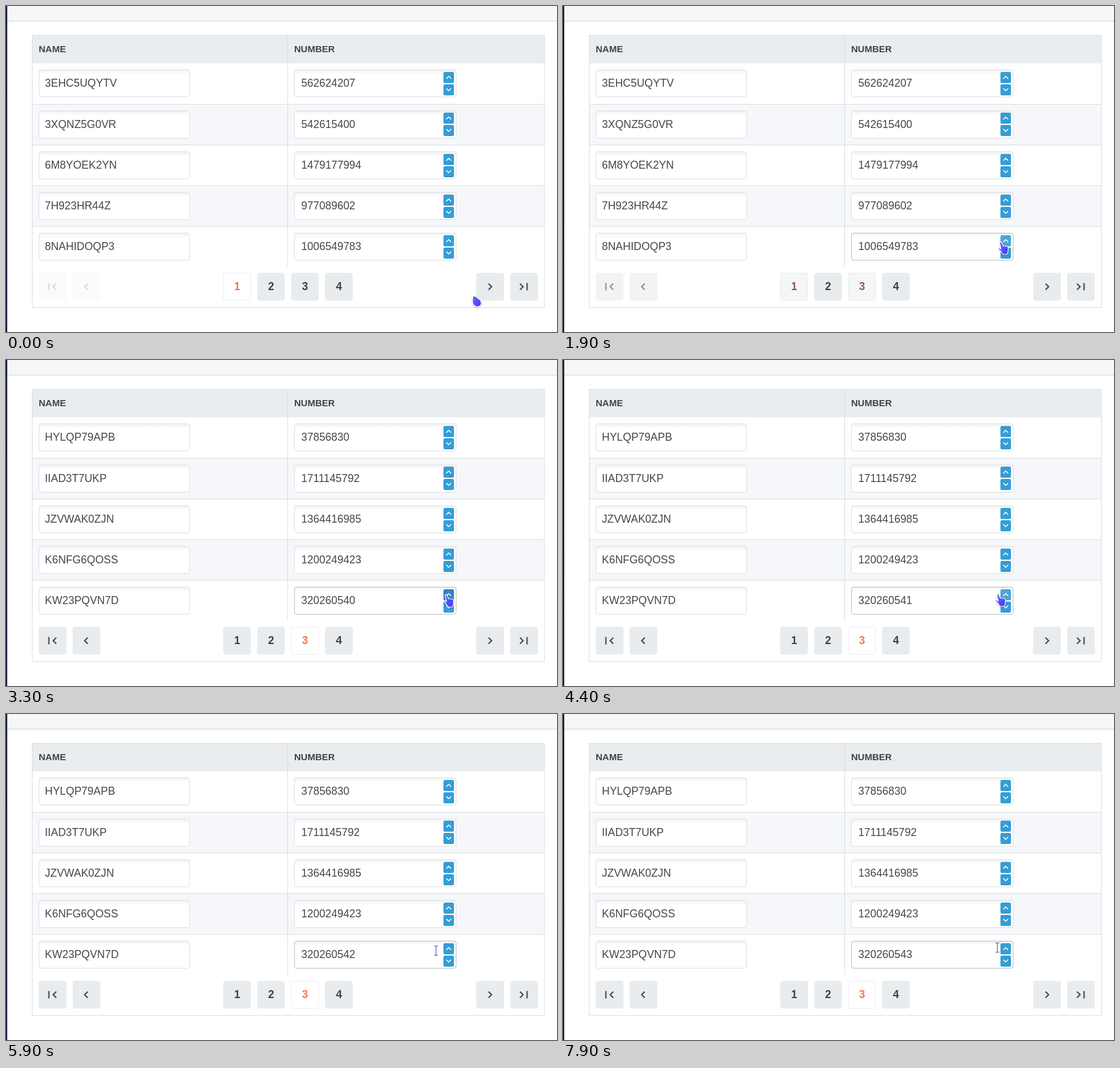
An HTML page for the animation above (8 s loop, 893 px wide and 529 px high).

```html
<!DOCTYPE html>
<html lang="en">
<head>
<meta charset="utf-8">
<title>Editable table</title>
<style>
html, body { margin: 0; width: 100%; height: 100%; overflow: hidden; background: #fff; }
svg { display: block; }
text { font: 17.5px "Liberation Sans", Arial, sans-serif; fill: #40484e; }
.head { font-size: 15px; font-weight: bold; fill: #3d464d; }
.page { font-weight: bold; text-anchor: middle; }
.icon { fill: none; stroke: #43484c; stroke-width: 2.1; }
.spin { fill: none; stroke: #fff; stroke-width: 1.5; stroke-linecap: round; stroke-linejoin: round; }
.cursor { stroke: #fff; stroke-width: 1.2; stroke-linejoin: round; filter: drop-shadow(0 1px 1px rgba(0,0,0,.25)); }
</style>
</head>
<body>
<svg id="stage" width="893" height="529" viewBox="0 0 893 529">
  <defs>
    <linearGradient id="edge" x2="0" y2="1">
      <stop stop-color="#0b1a3c"/><stop offset="1" stop-color="#2a0d52"/>
    </linearGradient>
    <linearGradient id="inset" x2="0" y2="1">
      <stop stop-color="#f2f2f2"/><stop offset=".17" stop-color="#fff"/>
    </linearGradient>
    <linearGradient id="ink" x2="1" y2="1">
      <stop stop-color="#7a62f6"/><stop offset="1" stop-color="#3d3dff"/>
    </linearGradient>
  </defs>
</svg>
<script>
const LOOP = 8000, STEP = 100, FADE = 200;
const BASE = 320260538;
const GREY = '#e9ecef', INK = '#394147', ACCENT = { 1: '#fa6b53', 3: '#f2784b' };

const PAGES = {
  1: [['3EHC5UQYTV', 562624207], ['3XQNZ5G0VR', 542615400], ['6M8YOEK2YN', 1479177994],
      ['7H923HR44Z', 977089602], ['8NAHIDOQP3', 1006549783]],
  3: [['HYLQP79APB', 37856830], ['IIAD3T7UKP', 1711145792], ['JZVWAK0ZJN', 1364416985],
      ['K6NFG6QOSS', 1200249423], ['KW23PQVN7D', BASE]]
};

// Times at which the table alternates between page 3 and page 1
const FLIPS = [700, 1800, 2700, 3400, 3900, 4700, 5400, 6300, 7100];

// Pointer stops: time, x, y
const PATH = [
  [0, 757, 470], [500, 493, 462], [1000, 493, 462], [1300, 757, 466], [1600, 714, 384],
  [1900, 714, 384], [2400, 494, 464], [2800, 493, 464], [3200, 718, 382], [3400, 718, 382],
  [3800, 492, 468], [4000, 494, 466], [4400, 709.5, 381], [4500, 713, 382], [4700, 714, 382],
  [5200, 494, 461], [5500, 493, 461], [5900, 697, 384], [6100, 716, 382], [6300, 716, 382],
  [6800, 492, 458], [6900, 493, 458], [7100, 493, 458], [7900, 704, 379]
];

const stage = document.getElementById('stage');

function add(tag, attrs, parent = stage) {
  const el = document.createElementNS('http://www.w3.org/2000/svg', tag);
  for (const key in attrs) el.setAttribute(key, attrs[key]);
  return parent.appendChild(el);
}
const rect = (x, y, width, height, fill, more) => add('rect', { x, y, width, height, fill, ...more });
function label(x, y, str, cls = '') {
  const el = add('text', { x, y, class: cls });
  el.textContent = str;
  return el;
}

// Page chrome and table grid
rect(0, 0, 893, 24, '#f7f7f7');
rect(0, 24, 893, 1, '#d3d4d5');
rect(0, 0, 2, 529, 'url(#edge)');
rect(42, 47, 831, 46, '#e9edf0');
for (const y of [160, 292]) rect(43, y, 829, 65, '#f5f7fb');
for (const y of [159, 225, 291, 357]) rect(43, y, 829, 1, '#dadee1');
rect(456, 47, 1, 376, '#dadee1');
rect(42.5, 47.5, 830, 442, 'none', { stroke: '#dadee1' });
label(53, 75, 'NAME', 'head');
label(467, 75, 'NUMBER', 'head');

// Input rows
const field = (x, y, w) =>
  rect(x + .5, y + .5, w - 1, 44, 'url(#inset)', { rx: 3.5, stroke: '#dcdfe1' });

const rows = [103, 170, 236, 302, 368].map((y, i) => {
  field(53, y, 245);
  const box = field(467, y, 263);
  const top = Math.round(107 + 66.25 * i);
  const up = rect(709, top, 17, 18, '#359dd6', { rx: 2.5 });
  const down = rect(709, top + 20, 17, 18, '#359dd6', { rx: 2.5 });
  add('path', { d: `M714 ${top + 10.5}l3.5-3.5 3.5 3.5M714 ${top + 27}l3.5 3.5 3.5-3.5`, class: 'spin' });
  return { box, up, down, name: label(63, y + 28, ''), num: label(478.5, y + 28, '') };
});
const last = rows[4];

// Paginator
function navButton(x, d) {
  const g = add('g', {});
  add('rect', { x, y: 433, width: 45, height: 45, rx: 4, fill: GREY }, g);
  add('path', { d, class: 'icon' }, g);
  return g;
}
const back = [
  navButton(53, 'M69.5 449.5v12M81.5 450.5l-5 5 5 5'),
  navButton(108, 'M132.5 450.5l-5 5 5 5')
];
navButton(762, 'M782 450.5l5 5-5 5');
navButton(817, 'M833 450.5l5 5-5 5M844.5 449.5v12');

const numbers = [1, 2, 3, 4].map((n, i) => {
  const x = 352 + 55 * i;
  return {
    n,
    box: rect(x + .5, 433.5, 44, 44, GREY, { rx: 3.5, stroke: GREY }),
    text: label(x + 22.5, 461, n, 'page')
  };
});

// Pointer shapes, each with its hot spot at 0,0
const shapes = {
  arrow: add('path', {
    d: 'M0 0Q7 2 11 6.5Q15 12 12 16Q9 19 4.5 17.5Q-.5 15.500-1 10Q-1 4 0 0Z',
    fill: 'url(#ink)', class: 'cursor'
  }),
  hand: add('path', {
    d: 'M-6.500.5Q-5.500-2-3.500-1L-.5 5.500L6 6Q8 7 7.500 11L7 15Q6.500 19 4 19H-.5Q-3 17.500-4.500 14L-8 10.500Q-9 8.500-6.500 8.500L-4 10Z',
    fill: 'url(#ink)', class: 'cursor'
  }),
  beam: add('path', {
    d: 'M-3-7.500h2.500l.5.500.5-.5h2.500M0-7V7M-3 7.500h2.500l.5-.5.5.500h2.500',
    fill: 'none', stroke: '#5748a8', 'stroke-width': 1.1
  })
};

const clamp = v => Math.max(0, Math.min(1, v));
const channels = hex => [1, 3, 5].map(i => parseInt(hex.slice(i, i + 2), 16));
function mix(a, b, k) {
  const to = channels(b);
  return `rgb(${channels(a).map((v, i) => Math.round(v + (to[i] - v) * k))})`;
}

function pointerAt(t) {
  const i = PATH.findIndex(p => p[0] > t);
  if (i < 0) return PATH[PATH.length - 1].slice(1);
  const [t0, x0, y0] = PATH[i - 1], [t1, x1, y1] = PATH[i];
  const k = (t - t0) / (t1 - t0), e = k * k * (3 - 2 * k);
  return [x0 + (x1 - x0) * e, y0 + (y1 - y0) * e];
}

const inside = (x, y, l, t, w, h) => x >= l && x < l + w && y >= t && y < t + h;

function draw(t) {
  const count = FLIPS.filter(f => f <= t).length;
  const page = count % 2 ? 3 : 1;
  const fade = count ? clamp((t - FLIPS[count - 1]) / FADE) : 1;
  const third = page === 3 ? fade : 1 - fade;

  rows.forEach((row, i) => {
    const [name, num] = PAGES[page][i];
    row.name.textContent = name;
    row.num.textContent = num === BASE ? BASE + (count + 1) / 2 : num;
  });

  for (const { n, box, text } of numbers) {
    const on = n === 1 ? 1 - third : n === 3 ? third : 0;
    box.setAttribute('fill', mix(GREY, '#ffffff', on));
    text.style.fill = mix(INK, ACCENT[n] || INK, on);
  }
  for (const g of back) g.setAttribute('opacity', .2 + .8 * third);

  const [x, y] = pointerAt(t);
  const onField = inside(x, y, 467, 368, 263, 45);
  const onUp = inside(x, y, 709, 372, 17, 18);
  const onDown = inside(x, y, 709, 392, 17, 18);
  const onPage = numbers.some((b, i) => inside(x, y, 352 + 55 * i, 433, 45, 45));
  const pressed = page === 3 && FLIPS[count] - t <= 200;

  last.box.setAttribute('stroke', onField ? '#b9c0c1' : '#dcdfe1');
  last.up.setAttribute('fill', !onUp ? '#359dd6' : pressed ? '#2c86bd' : '#4ca6db');
  last.down.setAttribute('fill', onDown ? '#4ca6db' : '#359dd6');

  const kind = onUp || onDown || onPage ? 'hand' : onField ? 'beam' : 'arrow';
  for (const key in shapes) {
    shapes[key].setAttribute('visibility', key === kind ? 'visible' : 'hidden');
    shapes[key].setAttribute('transform', `translate(${x} ${y})`);
  }
}

const start = performance.now();
function tick() {
  const t = (performance.now() - start) % LOOP;
  draw(Math.floor(t / STEP) * STEP);
  requestAnimationFrame(tick);
}
tick();
</script>
</body>
</html>
```
